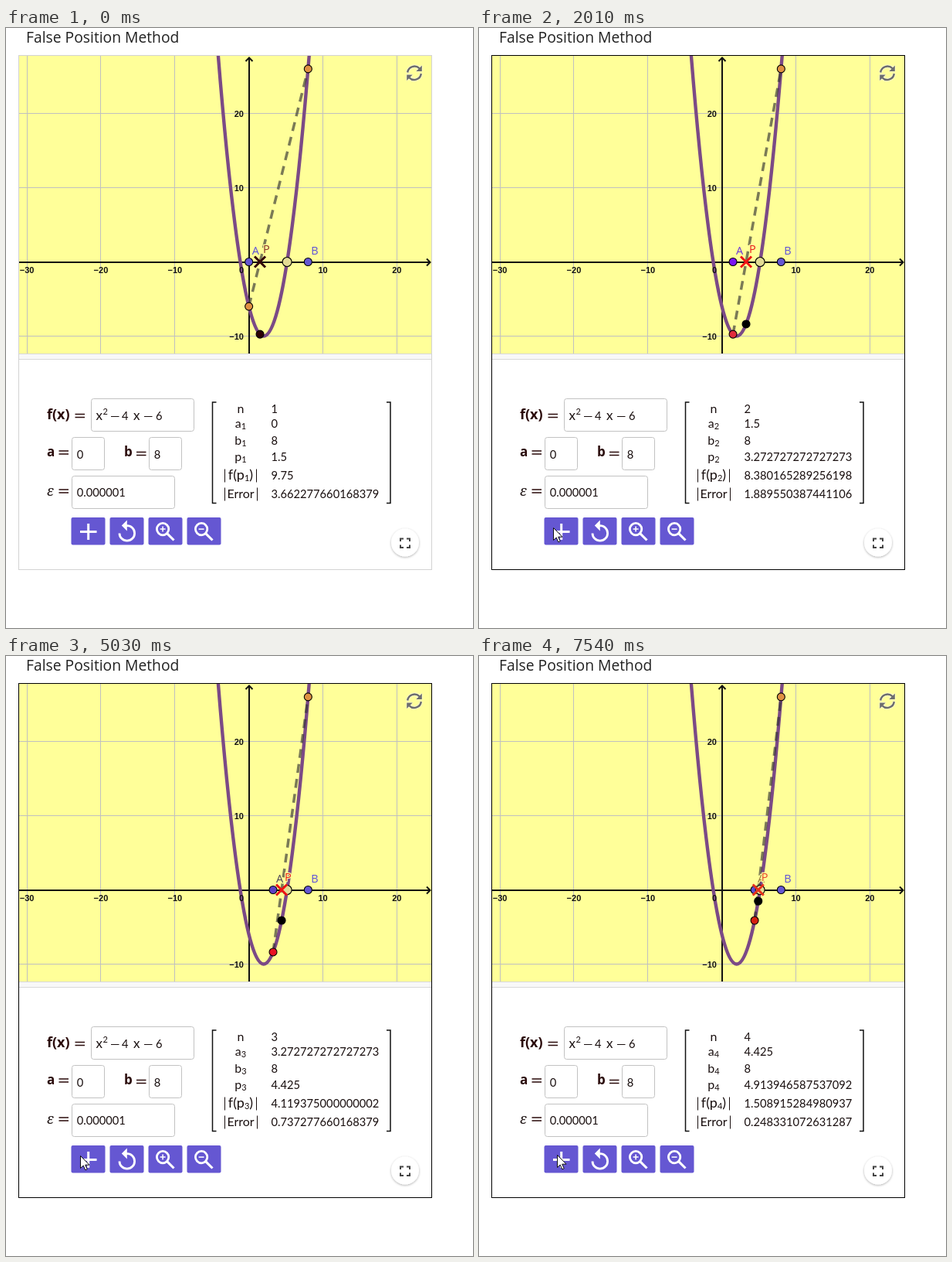
These frames come from a looping animation (605 by 776 pixels, 8000 ms). An HTML page:

```html
<!DOCTYPE html>
<html lang="en">
<head>
<meta charset="utf-8">
<title>False Position Method</title>
<style>
  html, body { margin: 0; width: 100%; height: 100%; overflow: hidden; background: #fff; }
  svg { display: block; width: 100vw; height: 100vh; }
  text { font-family: Lato, sans-serif; font-size: 14.7px; fill: #1a1010; }
  .title { font-family: "Open Sans", sans-serif; font-size: 19.3px; fill: #222; }
  .bold { font-family: "Open Sans", sans-serif; font-size: 18px; font-weight: 700; fill: #2a0a0a; }
  .tick { font: bold 11px "Liberation Sans", sans-serif; fill: #111; }
  .name { font: 14.5px "Open Sans", sans-serif; paint-order: stroke; stroke: #ffff99; stroke-width: 2.5; }
  .label { font-size: 16px; text-anchor: middle; }
  .wide { font-size: 18px; }
  .sub { font-size: 11px; }
  .math { vector-effect: non-scaling-stroke; fill: none; }
  .box { fill: #fff; stroke: #c2c2c2; }
  .button { fill: #6557d2; }
  .icon { fill: none; stroke: #fff; }
  .point { stroke: #000; stroke-width: 1.1; }
</style>
</head>
<body>
<svg viewBox="0 0 605 776" preserveAspectRatio="none">
  <defs>
    <clipPath id="view"><rect x="17" y="36" width="534" height="385"/></clipPath>
    <filter id="shadow" x="-30%" y="-30%" width="160%" height="160%">
      <feDropShadow dx="0" dy="1" stdDeviation="1.5" flood-opacity=".32"/>
    </filter>
    <g id="lens" class="icon" stroke-width="2">
      <circle cx="9.5" cy="9.5" r="5.5"/>
      <path d="M13.6 13.6L19.8 19.8" stroke-width="2.2"/>
    </g>
    <g id="turn">
      <path d="M520.2 57.5A9 9 0 0 1 535.5 52.2M537.8 59A9 9 0 0 1 522.5 64.3" fill="none" stroke-width="2.4"/>
      <path d="M538.8 48.5V56H531.3ZM519.2 68V60.5H526.7Z" stroke="none"/>
    </g>
  </defs>

  <text class="title" x="26" y="19.3">False Position Method</text>

  <rect x="17" y="36" width="534" height="385" fill="#ffff99"/>
  <rect x="17" y="421" width="534" height="7.5" fill="#f8f8f8"/>
  <path d="M17 421.5H551M17 428.5H551" stroke="#d8d8d8"/>
  <g clip-path="url(#view)">
    <g id="grid" stroke="#c0c0c0"></g>
    <path d="M17 303H549M545 298.5L549.5 303L545 307.5M315 421V39M310.5 43L315 38.5L319.5 43" fill="none" stroke="#111" stroke-width="2"/>
    <path class="math" transform="translate(314.65 302.5) scale(9.585 -9.6)" d="M-4.5 32.25Q2 -52.25 8.5 32.25" stroke="#7b4a86" stroke-width="4.4"/>
    <g id="ticks"></g>
    <g id="plot"></g>
  </g>
  <use href="#turn" fill="#fff" stroke="#fff" style="filter:drop-shadow(0 0 1px #fff)"/>
  <use href="#turn" fill="#6c6c6c" stroke="#6c6c6c"/>
  <rect id="border" x="16.5" y="35.5" width="535" height="665" fill="none"/>

  <text class="bold" x="53" y="506">f(x)</text>
  <text class="bold" x="53" y="553.5" style="font-size:17px">a</text>
  <text class="bold" x="153" y="554" style="font-size:17px">b</text>
  <text x="53" y="605" style="font:italic 18px 'Noto Serif',serif">ε</text>
  <path d="M89.5 499.5h12.5m-12.5 4h12.5M68.5 547h12.5m-12.5 4h12.5M169 548.5h12.5m-12.5 4h12.5M68.5 597h12.5m-12.5 4h12.5" stroke="#2a0a0a" stroke-width="1.7"/>
  <rect class="box" x="110.5" y="479.5" width="133" height="42" rx="3"/>
  <rect class="box" x="85.5" y="529.5" width="42" height="42" rx="3"/>
  <rect class="box" x="185.5" y="529.5" width="42" height="42" rx="3"/>
  <rect class="box" x="85.5" y="579.5" width="133" height="42" rx="3"/>
  <text x="116.5" y="507" style="font-size:17px">x</text>
  <text class="sub" x="125.5" y="500">2</text>
  <path d="M136 502.5h10.5M179 502.5h10.5" stroke="#1a1010" stroke-width="1.1"/>
  <text x="150" y="507">4</text>
  <text x="165" y="507" style="font-size:17px">x</text>
  <text x="194" y="507">6</text>
  <text x="91.7" y="556.5">0</text>
  <text x="191.7" y="556.5">8</text>
  <text x="91.7" y="606">0.000001</text>

  <path d="M272.5 484H267.5V614.5H272.5M493 484H498V614.5H493" fill="none" stroke="#111" stroke-width="1.5"/>
  <path d="M283.5 570.5v17M324.5 570.5v17M283.5 594.5v17M325.5 594.5v17" stroke="#1a1010"/>
  <g id="table"></g>

  <rect id="add" class="button" x="84.5" y="633" width="44" height="35.5" rx="2"/>
  <rect class="button" x="134.5" y="633" width="44" height="35.5" rx="2"/>
  <rect class="button" x="184.5" y="633" width="44" height="35.5" rx="2"/>
  <rect class="button" x="234.5" y="633" width="44" height="35.5" rx="2"/>
  <path class="icon" d="M96 651.5H117.5M106.7 641V662" stroke-width="3"/>
  <path transform="translate(140 635.2) scale(1.4)" fill="#fff" d="M12 5V1L7 6l5 5V7a6 6 0 1 1-6 6H4a8 8 0 1 0 8-8z"/>
  <g transform="translate(189.8 634.8) scale(1.4)">
    <use href="#lens"/><path class="icon" d="M7 9.5h5M9.5 7v5" stroke-width="1.1"/>
  </g>
  <g transform="translate(239.8 634.8) scale(1.4)">
    <use href="#lens"/><path class="icon" d="M7 9.5h5" stroke-width="1.1"/>
  </g>
  <circle cx="517" cy="665.5" r="18" fill="#fff" filter="url(#shadow)"/>
  <path d="M511 664V660.5H515M519 660.5H523V664M523 668.5V672H519M515 672H511V668.5" fill="none" stroke="#444" stroke-width="2"/>

  <g id="pointer">
    <path id="hand" fill="#fff" stroke="#111" d="M5.5 14V2Q5.5.5 7 .5T8.5 2V8Q11 7 11.4 9Q13.6 8 14 10Q16.5 9.4 16.5 12V16.5L14.5 20V23H6.5V20.5L1 14Q0 11.7 2.3 11.9Z"/>
    <path id="arrow" fill="#fff" stroke="#111" d="M.5.5V16.5L4.2 13L6.8 18.8L9.2 17.8L6.7 12.2H12Z"/>
  </g>
  <circle id="glow" cx="97" cy="646" r="15" fill="#f2e83c" fill-opacity=".55"/>
</svg>
<script>
  const DURATION = 8000;
  const $ = id => document.getElementById(id);
  const px = x => 314.65 + 9.585 * x;
  const py = y => 302.5 - 9.6 * y;
  const f = x => x * x - 4 * x - 6;
  const B = 8, ROOT = 2 + Math.sqrt(10);

  const steps = [
    { at: 0, a: 0, p: 1.5, values: ["0", "1.5", "9.75", "3.662277660168379"],
      border: "#d3d3d3", aFill: "#6557d2", aName: "#5c50d8", faFill: "#df9142", pFill: "#330508", pName: "#8a3028", fpFill: "#2b0004" },
    { at: 2010, a: 1.5, p: 3.272727272727273, values: ["1.5", "3.272727272727273", "8.380165289256198", "1.889550387441106"],
      border: "#000", aFill: "#7a14f0", aName: "#6a35d8", faFill: "#e02c3c", pFill: "#f01414", pName: "#e81c1c", fpFill: "#000" },
    { at: 4540, a: 3.272727272727273, p: 4.425, values: ["3.272727272727273", "4.425", "4.119375000000002", "0.737277660168379"],
      border: "#000", aFill: "#5c40c4", aName: "#4c4458", faFill: "#e81224", pFill: "#f01414", pName: "#e81c1c", fpFill: "#000" },
    { at: 7540, a: 4.425, p: 4.913946587537092, values: ["4.425", "4.913946587537092", "1.508915284980937", "0.248331072631287"],
      border: "#000", aFill: "#5c4cd0", aName: "#96783c", faFill: "#d4200f", pFill: "#e8301a", pName: "#e8452a", fpFill: "#000" }
  ];

  const pointers = [
    { at: 0 },
    { at: 500, kind: "hand", x: 116, y: 649 },
    { at: 1030, kind: "hand", x: 89, y: 646 },
    { at: 1510, kind: "hand", x: 91, y: 646 },
    { at: 2010, kind: "arrow", x: 96, y: 646 },
    { at: 4540, kind: "arrow", x: 96, y: 646, pressed: true },
    { at: 5030, kind: "arrow", x: 96, y: 646 },
    { at: 5530, kind: "hand", x: 96, y: 640 },
    { at: 6530, kind: "hand", x: 96, y: 645 },
    { at: 7540, kind: "arrow", x: 101, y: 645 }
  ];

  const text = (x, y, cls, content, extra = "") => `<text x="${x}" y="${y}" class="${cls}" ${extra}>${content}</text>`;
  const dot = (x, y, fill, r = 5) => `<circle class="point" cx="${px(x)}" cy="${py(y)}" r="${r}" fill="${fill}"/>`;
  const name = (x, y, letter, color) => text(px(x) + 4, y, "name", letter, `style="fill:${color}"`);
  const snap = v => Math.floor(v) + 0.5;

  function drawAxes() {
    const xs = [-30, -20, -10, 10, 20], ys = [20, 10, -10];
    const label = n => String(n).replace("-", "−");
    $("grid").innerHTML =
      xs.map(x => `<path d="M${snap(px(x))} 36V421"/>`).join("") +
      ys.map(y => `<path d="M17 ${snap(py(y))}H551"/>`).join("");
    $("ticks").innerHTML =
      xs.map(x => text(px(x), 317, "tick", label(x), 'text-anchor="middle"')).join("") +
      ys.map(y => text(308, py(y) + 4.3, "tick", label(y), 'text-anchor="end"')).join("") +
      text(308, 317, "tick", "0", 'text-anchor="end"');
  }

  function drawStep(s, n) {
    const { a, p } = s;
    $("plot").innerHTML =
      `<path d="M${px(a)} ${py(f(a))}L${px(B)} ${py(f(B))}" stroke="#333" stroke-opacity=".65" stroke-width="3.5" stroke-dasharray="11.5 8"/>` +
      dot(a, 0, s.aFill) + dot(B, 0, "#6557d2") +
      dot(a, f(a), s.faFill) + dot(B, f(B), "#df9142") +
      dot(p, f(p), s.fpFill) + dot(ROOT, 0, "#e3dc94", 6) +
      `<path transform="translate(${px(p)} 302.5)" d="M-7 -7L7 7M-7 7L7 -7" stroke="${s.pFill}" stroke-width="3"/>` +
      name(a, 293, "A", s.aName) + name(B, 293, "B", "#5c50d8") + name(p, 290.5, "P", s.pName);

    const sub = `<tspan class="sub" dy="2">${n}</tspan>`;
    const [va, vp, vf, ve] = s.values;
    const rows = [
      ["n", n, 497.5], ["a" + sub, va, 517], ["b" + sub, B, 538.5], ["p" + sub, vp, 559.5],
      [`<tspan class="wide">f(p</tspan>${sub}<tspan class="wide" dy="-2">)</tspan>`, vf, 583.5], ["Error", ve, 607.5]
    ];
    $("table").innerHTML = rows.map(([label, value, y]) =>
      text(304, y, "label", label) + text(343.5, y, "", value)).join("");
    $("border").setAttribute("stroke", s.border);
  }

  function drawPointer(c) {
    $("pointer").setAttribute("transform", `translate(${c.x || 0} ${c.y || 0})`);
    for (const kind of ["hand", "arrow"]) $(kind).style.display = c.kind === kind ? "" : "none";
    $("glow").style.display = c.pressed ? "" : "none";
    $("add").style.fill = c.pressed ? "#483e93" : "";
  }

  const indexAt = (list, t) => list.filter(item => item.at <= t).length - 1;
  let shownStep = -1, shownPointer = -1;

  function render(now) {
    const t = now % DURATION;
    const step = indexAt(steps, t), pointer = indexAt(pointers, t);
    if (step !== shownStep) drawStep(steps[shownStep = step], step + 1);
    if (pointer !== shownPointer) drawPointer(pointers[shownPointer = pointer]);
    requestAnimationFrame(render);
  }

  drawAxes();
  render(performance.now());
</script>
</body>
</html>
```
